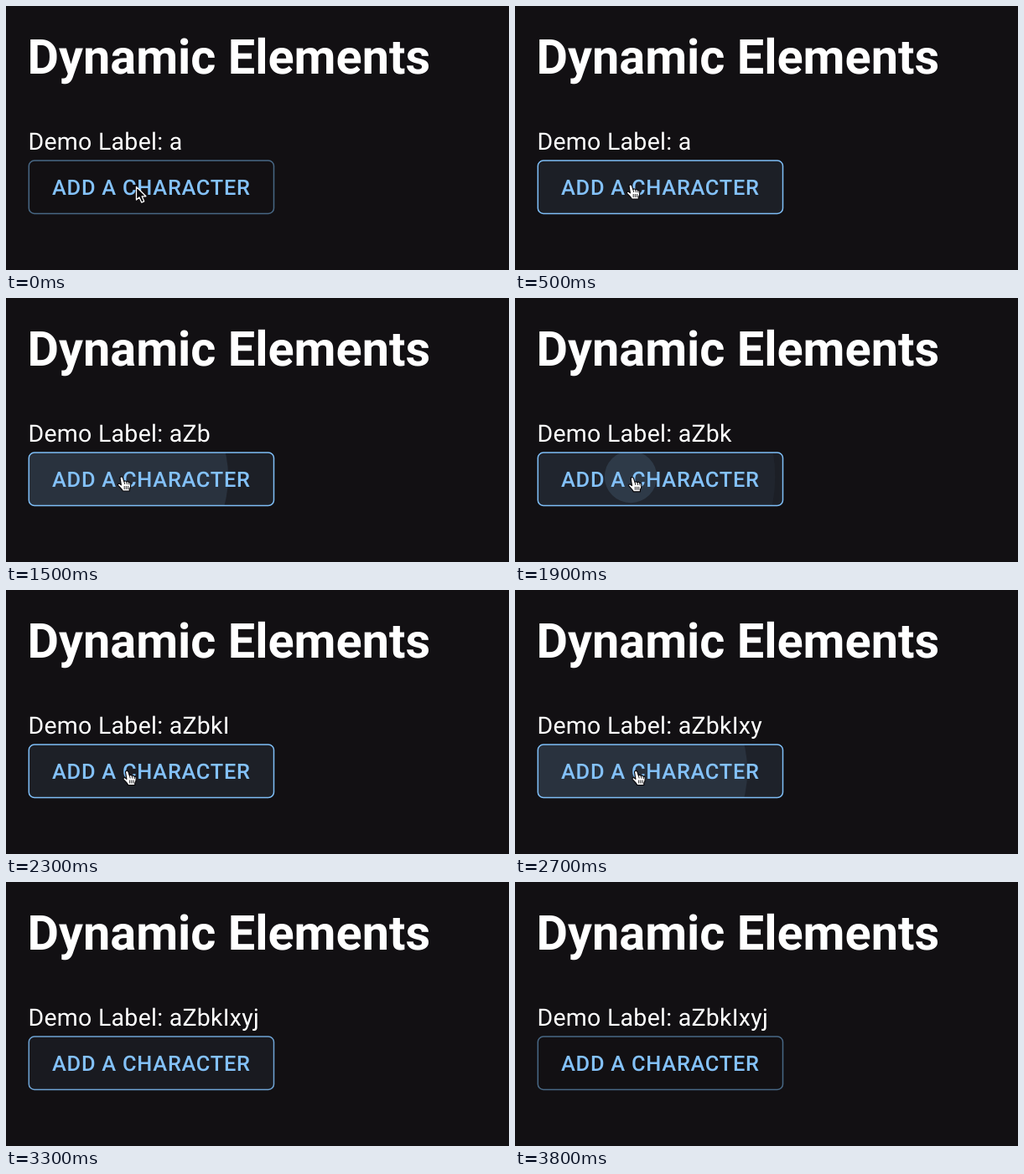
Write an HTML page that moves like this. It is 600x316 px and loops after 3.9 s.

```html
<!DOCTYPE html>
<html lang="en">
<head>
<meta charset="utf-8">
<title>Dynamic Elements</title>
<style>
  html, body { margin: 0; width: 100%; height: 100%; overflow: hidden; background: #121013; }
  svg { display: block; width: 600px; height: 316px; }
  text { font-family: Roboto, sans-serif; fill: #fff; white-space: pre; text-rendering: geometricPrecision; }
  .title { font-size: 57.65px; font-weight: 700; }
  .label { font-size: 28.5px; letter-spacing: .00938em; }
  .caption { font-size: 25.4px; font-weight: 500; letter-spacing: .02857em; fill: #84c2fa; }
</style>
</head>
<body>
<svg viewBox="0 0 600 316">
  <defs>
    <clipPath id="clip"><rect x="27" y="185" width="293" height="64" rx="7"/></clipPath>
  </defs>
  <rect width="600" height="316" fill="#121013"/>
  <text class="title" x="25.5" y="80.5">Dynamic Elements</text>
  <text class="label" x="26.5" y="172" id="label"></text>
  <g clip-path="url(#clip)" fill="#90caf9">
    <rect id="hover" x="27" y="185" width="293" height="64"/>
    <g id="ripples"></g>
  </g>
  <rect id="border" x="27.3" y="185.1" width="292.2" height="63.3" rx="6.5" fill="none" stroke="#7fbff8" stroke-width="1.5"/>
  <text class="caption" x="55" y="226">ADD A CHARACTER</text>
  <path id="arrow" d="M0 0V15.6L3.5 12.4L6.2 18.6L9.2 17.3L6.6 11.3H11.4Z" fill="#08070a" stroke="#fff" stroke-width="1.3" stroke-linejoin="round"/>
  <g id="hand" stroke-linejoin="round" stroke-linecap="round">
    <path d="M-2 1.5C-2-.5 1-.7 1.5 1.3L2.8 5.6C3.6 4.6 5.4 4.8 5.8 6.1C6.8 5.2 8.3 5.6 8.6 6.9C9.8 6.4 10.8 7.2 10.8 8.6C10.9 11.4 10.5 13 9.3 14.6V17H1.2C.6 14.9-2 13-4.2 10.4C-5.4 8.8-3.6 7.5-2.1 8.6L-.6 9.8Z" fill="#fff" stroke="#08070a" stroke-width="1.2"/>
    <path d="M3 6L3.6 8.6M5.9 6.5L6.4 8.8M8.6 7.3L8.9 9.2M3.2 11.4V14.6M5.4 11.4V14.6M7.6 11.4V14.6" fill="none" stroke="#08070a" stroke-width=".9"/>
  </g>
</svg>
<script>
const LOOP = 3900, STEP = 100, LATENCY = 130;
const ENTER = 550, HOLD = 40, FADE = 250;
const HOVER_ON = 50, HOVER_OFF = 3230, HIDE = 3100;
const presses = [[570, "Z"], [1260, "b"], [1530, "k"], [1780, "I"], [2280, "x"], [2440, "y"], [2740, "j"]];
const box = { x: 27, y: 185, w: 293, h: 64 };

const $ = id => document.getElementById(id);
const set = (el, attrs) => { for (const k in attrs) el.setAttribute(k, attrs[k]); };
const clamp = v => Math.min(1, Math.max(0, v));
const mix = (a, b, p) => a + (b - a) * p;

// cubic-bezier(.4, 0, .2, 1)
function ease(v) {
  const x = clamp(v);
  let lo = 0, hi = 1;
  for (let i = 0; i < 24; i++) {
    const s = (lo + hi) / 2, r = 1 - s;
    if (1.2 * r * r * s + .6 * r * s * s + s ** 3 < x) lo = s; else hi = s;
  }
  return lo * lo * (3 - 2 * lo);
}

function pointer(t) {
  const a = ease((t - 50) / 400), b = ease((t - 1800) / 350);
  return { x: mix(155.5, 138, a) + 6.5 * b, y: mix(216.5, 214, a) + 2.5 * b };
}

const ripples = presses.map(() =>
  $("ripples").appendChild(document.createElementNS("http://www.w3.org/2000/svg", "circle")));

function drawRipple(el, t, down) {
  const p = pointer(down);
  const dx = Math.max(p.x - box.x, box.x + box.w - p.x) + 1;
  const dy = Math.max(p.y - box.y, box.y + box.h - p.y) + 1;
  const grow = ease((t - down) / ENTER);
  const fade = 1 - ease((t - down - HOLD) / ENTER);
  set(el, {
    cx: p.x, cy: p.y, r: Math.hypot(dx, dy) * grow,
    opacity: t < down ? 0 : mix(.1, .3, grow) * fade
  });
}

function draw(t) {
  const over = ease((t - HOVER_ON) / FADE) - ease((t - HOVER_OFF) / FADE);
  $("label").textContent = "Demo Label: a" +
    presses.filter(([down]) => t >= down + LATENCY).map(p => p[1]).join("");
  set($("hover"), { opacity: .08 * over });
  set($("border"), { "stroke-opacity": mix(.5, 1, over) });
  presses.forEach(([down], i) => drawRipple(ripples[i], t, down));

  const { x, y } = pointer(t), at = `translate(${x} ${y})`;
  const hand = t >= HOVER_ON;
  set($("arrow"), { transform: at, opacity: hand ? 0 : 1 });
  set($("hand"), { transform: at, opacity: hand && t < HIDE ? 1 : 0 });
}

const start = performance.now();
function tick() {
  const t = (performance.now() - start) % LOOP;
  draw(Math.floor(t / STEP) * STEP);
  requestAnimationFrame(tick);
}
tick();
</script>
</body>
</html>
```
